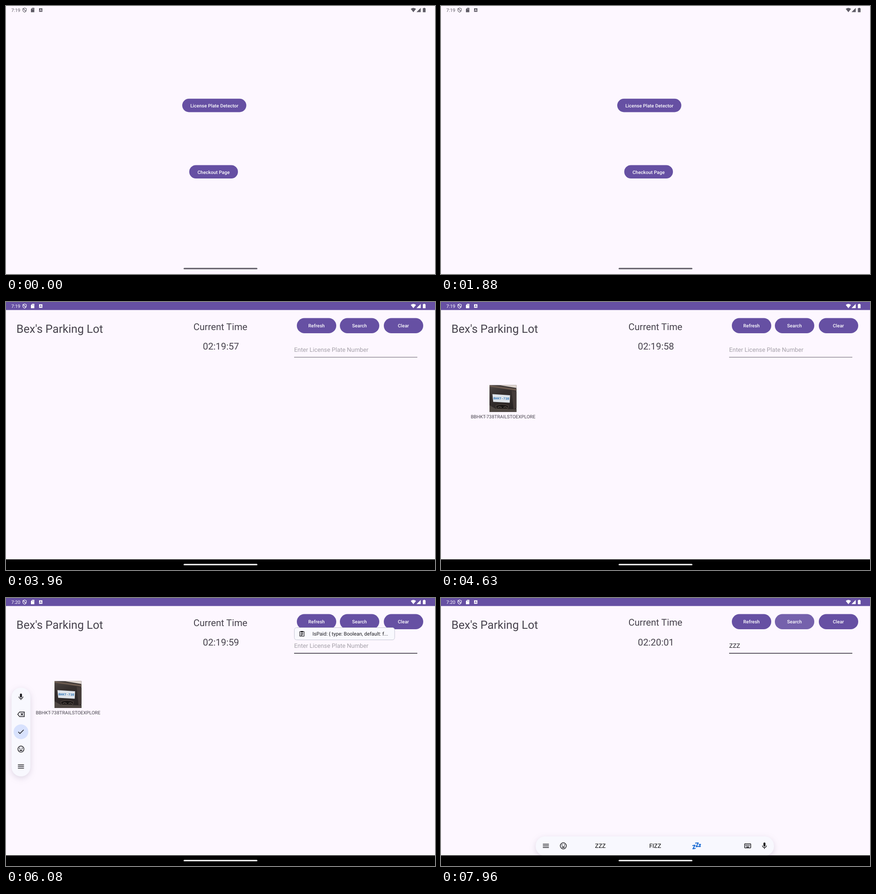
An HTML page for the animation above (8 s loop, 947 by 592 pixels).

```html
<!DOCTYPE html>
<html lang="en">
<head>
<meta charset="utf-8">
<title>Parking checkout</title>
<style>
  html, body { margin: 0; width: 100%; height: 100%; overflow: hidden; background: #fdf7ff; }
  svg.stage { display: block; width: 100vw; height: 100vh; }
  text { font-family: Roboto, sans-serif; font-size: 10.36px; text-rendering: geometricPrecision; white-space: pre; }
  .mid { text-anchor: middle; }
  .button rect { fill: #6650a3; }
  .button text { fill: #fff; font-weight: 500; letter-spacing: .07px; text-anchor: middle; }
  .big { font-size: 20.7px; fill: #47434d; text-anchor: middle; }
  .field { font-size: 13.3px; fill: #1d1b20; }
  .status { color: #5f5c66; fill: currentColor; }
  .line { fill: none; stroke: currentColor; stroke-width: 2; }
  .panel { fill: #f8f8fe; }
  .shade { filter: drop-shadow(0 4px 7px #5a507030); }
</style>
</head>
<body>
<svg class="stage" viewBox="0 0 947 592">
  <defs>
    <linearGradient id="paint" x1="0" y1="0" x2=".4" y2="1">
      <stop offset="0" stop-color="#4f4845"/>
      <stop offset=".4" stop-color="#37302f"/>
      <stop offset="1" stop-color="#292423"/>
    </linearGradient>
    <clipPath id="photoEdge"><rect x="107" y="183.5" width="59.5" height="59.5"/></clipPath>
    <clipPath id="searchEdge"><rect x="737" y="35.5" width="87" height="33.5" rx="16.75"/></clipPath>
    <clipPath id="aboveNav"><rect width="947" height="568.5"/></clipPath>
    <g id="mic">
      <path d="M12 14c1.66 0 3-1.34 3-3V5c0-1.66-1.34-3-3-3S9 3.34 9 5v6c0 1.66 1.34 3 3 3z"/>
      <path class="line" d="M6 11a6 6 0 0 0 12 0M12 17v4"/>
    </g>
    <g id="menu"><path class="line" d="M3 7h18M3 12h18M3 17h18"/></g>
    <g id="smile">
      <circle class="line" cx="12" cy="12" r="9"/>
      <circle cx="8.5" cy="9.5" r="1.6"/><circle cx="15.5" cy="9.5" r="1.6"/>
      <path d="M6.8 14h10.4a5.5 5.5 0 0 1-10.4 0z"/>
    </g>
    <g id="erase"><path class="line" d="M8 5h14v14H8l-5.500-7zM11.500 8.500l7 7m0-7l-7 7"/></g>
    <g id="check"><path class="line" d="M4 12.500l5 5L20 6.500"/></g>
    <g id="keys">
      <rect class="line" x="3" y="6" width="18" height="12" rx="1"/>
      <path class="line" stroke-dasharray="2 1" d="M5.500 9.500h13M5.500 12.500h13"/><path class="line" d="M8 15.700h8"/>
    </g>
    <g id="clip">
      <rect class="line" x="4" y="4" width="16" height="17" rx="1"/>
      <path d="M8 2h8v5H8z"/><path class="line" d="M7.500 10.500h9M7.500 14h9M7.500 17.500h6"/>
    </g>
  </defs>

  <rect width="947" height="592" fill="#fdf7ff"/>

  <g id="home">
    <g class="button"><rect x="389" y="204.800" width="141.500" height="29.600" rx="14.800"/><text x="460" y="223.700">License Plate Detector</text></g>
    <g class="button"><rect x="404.500" y="351.500" width="107.500" height="29.600" rx="14.800"/><text x="458.300" y="370.500">Checkout Page</text></g>
  </g>

  <g id="lot">
    <rect width="947" height="592" fill="#fdf7ff"/>
    <rect width="947" height="17.700" fill="#6650a3"/>
    <text x="23" y="68" style="font-size:25.150px" fill="#47434d">Bex's Parking Lot</text>
    <text id="caption" class="big" x="473.300" y="61.500">Current Time</text>
    <g id="clock"></g>
    <g class="button"><rect x="642" y="35.500" width="87" height="33.500" rx="16.750"/><text x="685.500" y="56.300">Refresh</text></g>
    <g class="button"><rect x="737" y="35.500" width="87" height="33.500" rx="16.750"/>
      <g clip-path="url(#searchEdge)"><circle id="ripple" cx="780" cy="52" r="46" fill="#fff"/></g>
      <text x="780.300" y="56.300">Search</text></g>
    <g class="button"><rect x="834" y="35.500" width="87" height="33.500" rx="16.750"/><text x="877.300" y="56.300">Clear</text></g>

    <path d="M636 122h272" stroke="#5c5862"/>
    <path id="focus" d="M636 122.200h272" stroke="#47434d" stroke-width="1.500"/>
    <text id="hint" class="field" x="636" y="110.300" style="fill:#a5a1a9">Enter License Plate Number</text>
    <g id="typed"></g>
    <path id="caret" d="M637 96.500v17.500" stroke="#1d1b20" stroke-width="1.200"/>

    <g id="car">
      <g clip-path="url(#photoEdge)">
        <rect x="107" y="183" width="60" height="61" fill="url(#paint)"/>
        <path d="M125 183h42v7z" fill="#ddd4ce"/>
        <path d="M107 184l60 8v4l-60-9z" fill="#6c5b50"/>
        <path d="M156 196l11 2v36l-7 3z" fill="#453c39"/>
        <path d="M107 228l14 8 46 1v7h-60z" fill="#4f4843"/>
        <path d="M113.500 203.500l39 2.500-.800 16.500-36.500-2z" fill="#dfe4ea"/>
        <path d="M121 229q13-5 28 0l-2 7h-24z" fill="#181514" stroke="#6b5d55" stroke-width=".8"/>
        <path d="M125 233q4-3 9 0m4 0q4-3 8 0" fill="none" stroke="#897b72"/>
        <text class="mid" x="133.300" y="215.500" transform="rotate(1.500 133 213)" fill="#3478b8" style="font:bold 7.300px 'Liberation Mono',monospace">BHKT-738</text>
      </g>
      <text class="mid" x="137" y="257.300" fill="#47434d">BBHKT-738TRAILSTOEXPLORE</text>
    </g>

    <g id="tools">
      <rect class="panel shade" x="12.300" y="198" width="41.500" height="196" rx="20.700"/>
      <circle cx="33" cy="295.500" r="16.300" fill="#d8e2fd"/>
    </g>
    <g id="popup">
      <rect x="636.500" y="65.500" width="221.500" height="27" rx="5" fill="#f9f9fe" stroke="#c5c5d2"/>
      <text x="676.500" y="83.200" style="font-size:11.100px" fill="#1b1b1f">IsPaid: { type: Boolean, default: f...</text>
    </g>
    <g clip-path="url(#aboveNav)">
      <g id="bar">
        <rect class="panel shade" x="209" y="526.500" width="526" height="43" rx="21"/>
        <text class="mid" x="351.800" y="552.300" style="font-size:13px">ZZZ</text>
        <text class="mid" x="472.800" y="552.300" style="font-size:13px">FIZZ</text>
        <g fill="none" stroke="#1769d2" stroke-width="2" stroke-linejoin="round">
          <path d="M555 547l6-1-5 8 6-1M561 541.500l7-.500-5 8.500 6-1M569 544.500l4-.300-3 5 3.500-.500"/>
        </g>
      </g>
    </g>
    <rect y="568.500" width="947" height="23.500" fill="#000"/>
  </g>

  <g class="status late" fill-rule="evenodd">
    <path fill="none" stroke="currentColor" stroke-width="1.200" d="M41 4.300l3.800 1.500v3q0 3.500-3.800 5-3.800-1.500-3.800-5v-3zM38 5.500l6 6.500"/>
    <path d="M58 4h4.500v9.700h-7.500V7zM58.200 5.500v2h.8v-2zm1.600 0v2h.8v-2z"/>
    <path d="M73 5h7.300v8H73zm3.200 1.500L74.300 11.500h1l.4-1.200h1.900l.4 1.200h1L77.100 6.500zm-.2 3l.650-1.800.650 1.800z"/>
  </g>
  <g class="status early">
    <text id="before" x="11.700" y="12.500">7:19</text>
    <text id="after" x="11.700" y="12.500">7:20</text>
    <path d="M915.500 4.300v9.300h-9.300z"/>
    <path d="M921.800 4h2.800v1.100h1.600v8.700h-6V5.100h1.600z"/>
  </g>
  <path class="status wifi" d="M893.500 6.500q5.800-4.500 11.600 0l-5.800 7.200z"/>
  <rect id="handle" x="392" y="578.500" width="163" height="3" rx="1.500" fill="#5d5a64"/>
</svg>

<script>
const LOOP = 8000;
const NS = 'http://www.w3.org/2000/svg';
const $ = (selector) => document.querySelector(selector);

// Each step is [time, style, easing]; a step without easing holds until the next.
function track(selector, steps) {
  const frames = steps.map(([time, style, easing = 'steps(1, end)']) =>
    ({ offset: time / LOOP, easing, ...style }));
  frames.push({ ...frames[frames.length - 1], offset: 1 });
  $(selector).animate(frames, { duration: LOOP, iterations: Infinity });
}
const alpha = (opacity) => ({ opacity });
const move = (x, y) => ({ transform: `translate(${x}px, ${y}px)` });

function show(selector, from, to = LOOP, fade = 0) {
  const steps = [];
  if (from > 0) steps.push([0, alpha(0)]);
  if (fade) steps.push([from, alpha(0), 'linear']);
  steps.push([from + fade, alpha(1)]);
  if (to < LOOP) {
    if (fade) steps.push([to - fade, alpha(1), 'linear']);
    steps.push([to, alpha(0)]);
  }
  track(selector, steps);
}

function addText(parent, id, content, className, x, y) {
  const text = document.createElementNS(NS, 'text');
  text.id = id;
  text.textContent = content;
  text.setAttribute('class', className);
  text.setAttribute('x', x);
  text.setAttribute('y', y);
  $(parent).append(text);
}

function addIcon(parent, name, x, y, size = 17.8) {
  const icon = document.createElementNS(NS, 'use');
  icon.setAttribute('href', '#' + name);
  icon.setAttribute('transform', `translate(${x - size / 2} ${y - size / 2}) scale(${size / 24})`);
  icon.setAttribute('color', '#1b1b1f');
  icon.setAttribute('fill', '#1b1b1f');
  $(parent).append(icon);
}

['mic', 'erase', 'check', 'smile', 'menu'].forEach((name, i) => addIcon('#tools', name, 33, 218.5 + 38.4 * i));
addIcon('#popup', 'clip', 653.3, 79, 14.5);
[['menu', 231.5], ['smile', 270], ['keys', 677], ['mic', 714]].forEach(([name, x]) => addIcon('#bar', name, x, 547.5));

// Screen change
const glide = 'cubic-bezier(.05, .7, .1, 1)';
track('#home', [[0, move(0, 0)], [3400, move(0, 0), glide], [3850, move(-95, 0)]]);
$('#lot').animate([
  { offset: 0, transform: 'translateX(95px)' },
  { offset: 3400 / LOOP, transform: 'translateX(95px)', easing: glide },
  { offset: 3850 / LOOP, transform: 'none' },
  { offset: 1, transform: 'none' }
], { duration: LOOP, iterations: Infinity });
show('#lot', 3440, LOOP, 85);

// Status icons turn white one group after another
const dark = { color: '#5f5c66' }, light = { color: '#ffffff' };
[['.early', 3240, 3360], ['.wifi', 3300, 3430], ['.late', 3390, 3480]].forEach(([group, from, to]) =>
  track(group, [[0, dark], [from, dark, 'linear'], [to, light]]));
track('#handle', [[0, { fill: '#5d5a64' }], [3420, { fill: '#5d5a64' }, 'linear'], [3520, { fill: '#ffffff' }]]);
show('#before', 0, 5900);
show('#after', 5900);

// Clock
['02:19:57', '02:19:58', '02:19:59', '02:20:00', '02:20:01'].forEach((time, i) => {
  addText('#clock', 'tick' + i, time, 'big', 474.5, 105.3);
  show('#tick' + i, i ? 3600 + 1000 * i : 0, i < 4 ? 4600 + 1000 * i : LOOP);
});

// Search field
const keys = [6600, 6850, 7150];
keys.forEach((time, i) => {
  addText('#typed', 'key' + i, 'Z', 'field', 636.3 + 8 * i, 110.3);
  show('#key' + i, time);
});
show('#hint', 0, keys[0]);
show('#focus', 5560);
track('#caret', [
  [0, { ...alpha(0), ...move(0, 0) }],
  [5560, { ...alpha(1), ...move(0, 0) }],
  [6060, { ...alpha(0), ...move(0, 0) }],
  ...keys.map((time, i) => [time, { ...alpha(1), ...move(8 * (i + 1), 0) }]),
  [7650, { ...alpha(0), ...move(24, 0) }]
]);

// Input panels
show('#tools', 5800, 6620, 100);
show('#popup', 5920, 6620, 80);
track('#bar', [
  [0, { ...alpha(0), ...move(0, 44) }],
  [6960, { ...alpha(1), ...move(0, 44), }, 'cubic-bezier(.4, 0, .1, 1)'],
  [7260, { ...alpha(1), ...move(0, 0) }]
]);
track('#caption', [[0, move(0, 0)], [6950, move(0, -1)]]);

// Parked car and search result
track('#car', [
  [0, { ...alpha(0), ...move(0, 0) }],
  [4100, { ...alpha(1), ...move(0, 0) }],
  [6950, { ...alpha(1), ...move(0, -42.5) }],
  [7880, { ...alpha(0), ...move(0, -42.5) }]
]);
$('#ripple').style.transformOrigin = '780px 52px';
track('#ripple', [
  [0, { opacity: 0, transform: 'scale(.3)' }],
  [7680, { opacity: .1, transform: 'scale(.3)' }, 'ease-out'],
  [7880, { opacity: .1, transform: 'scale(1)' }]
]);
</script>
</body>
</html>
```
